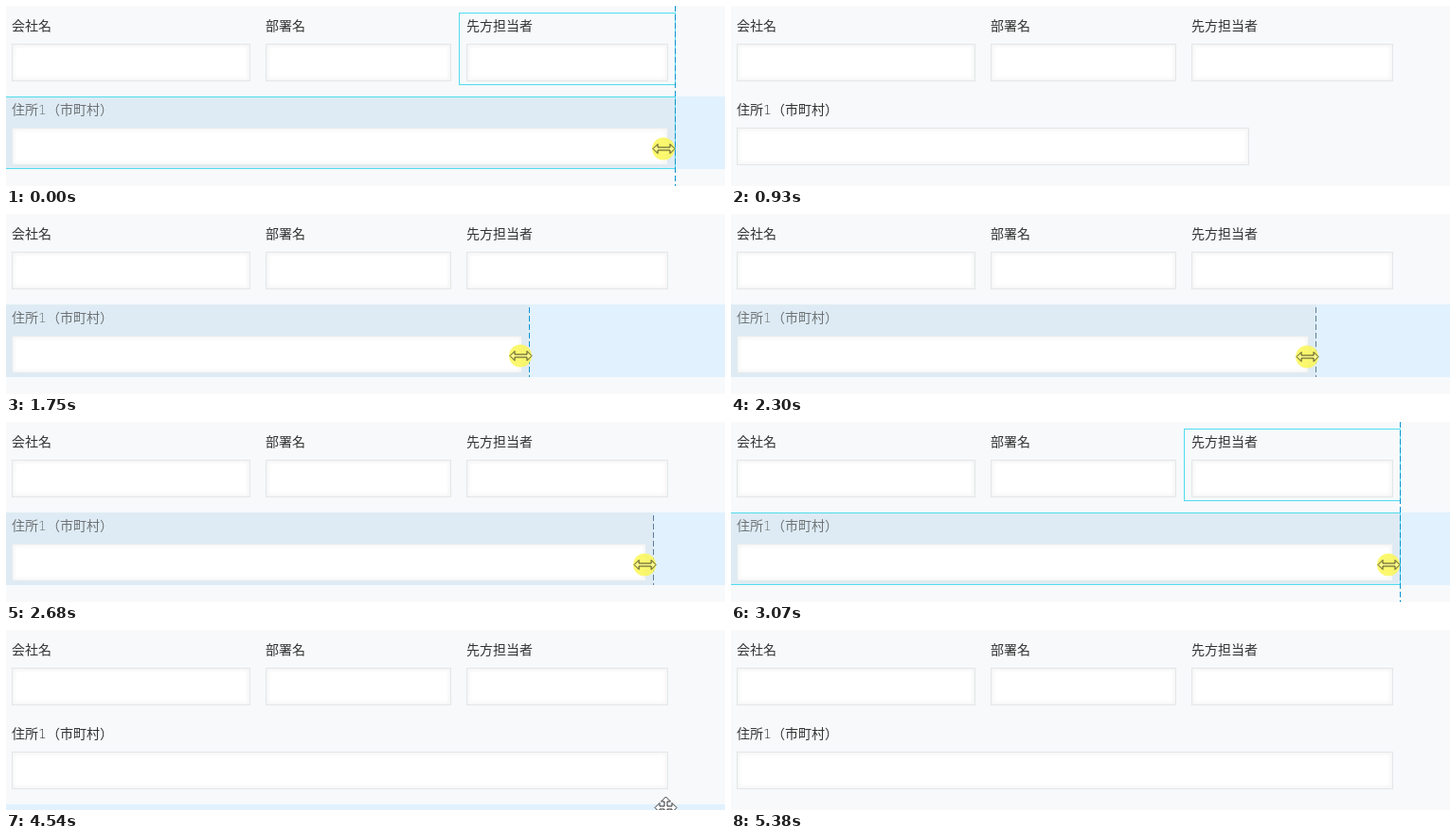
Recreate the animation shown at these times as an HTML page. Size 759 by 191 pixels, loop 5860 ms.

```html
<!DOCTYPE html>
<html lang="ja">
<head>
<meta charset="utf-8">
<title>Form field resize</title>
<style>
  html, body { margin: 0; width: 100%; height: 100%; overflow: hidden; }
  body { position: relative; background: #f7f9fb; color: #333; font: 300 14px/20px "DejaVu Sans", "Noto Sans CJK JP", "Noto Sans CJK", sans-serif; }
  div, svg { position: absolute; box-sizing: border-box; }
  .label { left: 6px; top: 11px; white-space: nowrap; }
  .field { left: 6px; top: 40px; height: 40px; background: #fff; border: 1px solid #e3e7e8;
    box-shadow: 2px 2px 4px #f5f5f5 inset, -2px -2px 4px #f5f5f5 inset; }
  .row { left: 0; width: 100%; height: 77px; background: #e1f1fe; }
  #row { top: 96px; }
  #next { top: 185px; }
  #shade { left: 0; top: 96px; height: 77px; background: #deebf4; }
  .snap { height: 77px; border: 1px solid #4fdcee; }
  #line { width: 1px; background: repeating-linear-gradient(var(--ink) 0 6px, transparent 6px 9px); }
  #pointer { left: 0; top: 0; width: 30px; height: 30px; margin: -15px; }
</style>
</head>
<body>
<div class="row" id="row"></div>
<div class="row" id="next"></div>
<div id="shade"></div>

<div class="label">会社名</div>
<div class="label" style="left:274px">部署名</div>
<div class="label" style="left:486px">先方担当者</div>
<div class="field" style="width:252px"></div>
<div class="field" style="left:274px;width:196px"></div>
<div class="field" style="left:486px;width:213px"></div>
<div class="label" id="label" style="top:100px">住所1（市町村）</div>
<div class="field" id="wide" style="top:129px"></div>

<div id="snaps">
  <div class="snap" style="left:478px;top:7px;width:229px"></div>
  <div class="snap" style="left:-1px;top:96px;width:708px"></div>
</div>
<div id="line"></div>

<svg id="pointer" viewBox="-15 -15 30 30" stroke-width="1">
  <circle id="press" cx="-.5" r="12" fill="#fbf85c" fill-opacity=".88"/>
  <path id="resize" stroke="#4c4a22" d="M-11.5 0l5-5v3.5h13v-3.5l5 5-5 5v-3.5h-13v3.5z"/>
  <path id="move" fill="#fff" stroke="#333" d="M0-11.5l5 5h-3.5v5h5v-3.5l5 5-5 5v-3.5h-5v5h3.5l-5 5-5-5h3.5v-5h-5v3.5l-5-5 5-5v3.5h5v-5h-3.5z"/>
</svg>

<script>
const LOOP = 5860, STEP = 76.67;
const $ = id => document.getElementById(id);
const show = (id, on) => { $(id).style.display = on ? '' : 'none'; };

// Held pointer positions: time, x, y
const stops = [
  [0, 694.5, 151], [930, 590, 230], [1000, 582, 188], [1070, 570, 179], [1150, 558, 167],
  [1220, 549, 156], [1290, 543.5, 150], [3070, 694.5, 151],
  [4460, 695, 167], [4540, 696.5, 188], [4620, 697, 230]
];
// Pointer travel while dragging: time, x
const drag = [[1920, 546], [2303, 608.5], [2457, 648.5], [2690, 675], [3070, 694.5]];

function dragX(t) {
  const i = Math.max(1, drag.findIndex(k => k[0] >= t));
  const [t0, x0] = drag[i - 1], [t1, x1] = drag[i];
  return x0 + (x1 - x0) * (t - t0) / (t1 - t0);
}

function pointerAt(t) {
  if (t >= 1920 && t < 3070) {
    const held = 1920 + Math.floor((t - 1912) / STEP) * STEP;
    return [dragX(Math.min(held, 3070)), held < 2300 ? 150 : 151];
  }
  return stops.filter(s => s[0] <= t).pop().slice(1);
}

function draw(t) {
  const [x, y] = pointerAt(t);
  const pressed = t < 930 || (t >= 1750 && t < 4000);
  const hot = y >= 96 && y < 173;
  const snapped = pressed && x > 688;
  const resized = t < 930 || t >= 4000;
  const edge = snapped || resized ? 707 : pressed ? Math.round(x + 9.5) : 555;

  show('row', hot);
  show('shade', hot);
  show('next', y >= 185 && (t >= 1000 && t < 1070 || t >= 4540 && t < 5380));
  $('next').style.opacity = t >= 4850 ? .5 : 1;
  $('shade').style.width = edge + 'px';
  $('wide').style.width = edge - 14 + 'px';
  $('wide').style.borderColor = hot ? '#e3ebef' : '';
  $('label').style.opacity = hot ? .65 : 1;

  show('snaps', snapped);
  show('line', pressed);
  const line = $('line').style;
  line.left = edge - 1 + 'px';
  line.top = snapped ? 0 : '99px';
  line.height = snapped ? '191px' : '74px';
  line.setProperty('--ink', snapped || t < 1912 ? '#0a94d0' : '#5b7c98');

  show('press', pressed);
  show('resize', hot);
  show('move', !hot);
  $('resize').setAttribute('fill', pressed ? '#fbf88a' : '#fff');
  $('pointer').style.transform = `translate(${x}px, ${y + .5}px)`;
}

function tick() {
  draw(performance.now() % LOOP);
  requestAnimationFrame(tick);
}
tick();
</script>
</body>
</html>
```
